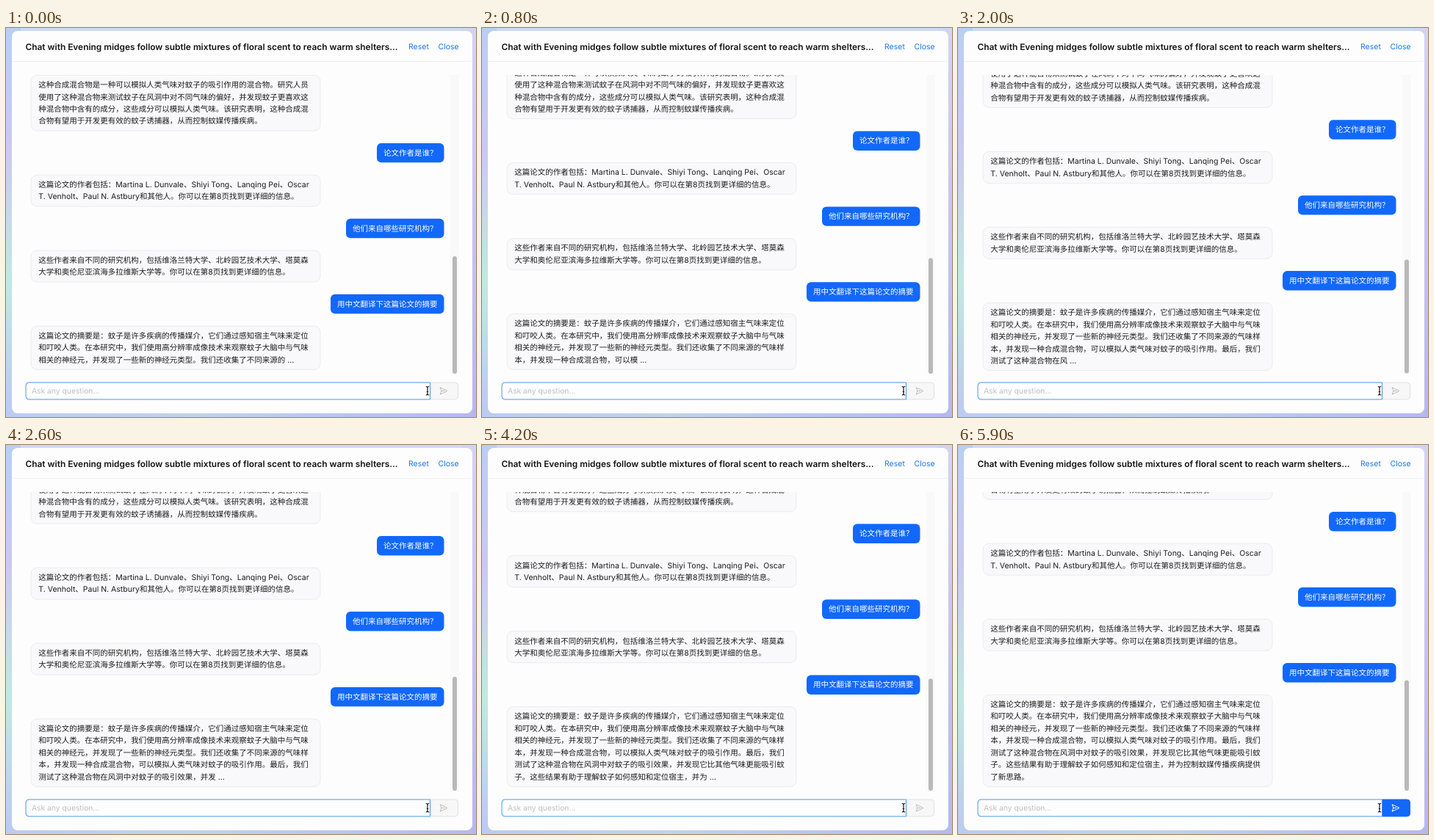
Write an HTML page that moves like this. It is 640 px wide and 530 px high and loops after 6000 ms.

```html
<!DOCTYPE html>
<html lang="zh-CN">
<head>
<meta charset="utf-8">
<title>Paper chat</title>
<style>
  html, body { margin: 0; width: 100%; height: 100%; overflow: hidden; background: #c9cdea; }
  svg { display: block; width: 640px; height: 530px; }
  text { font-family: Inter, "Noto Sans CJK SC", "Noto Sans CJK", sans-serif; font-size: 10.5px; text-rendering: geometricPrecision; white-space: pre; }
  .title { font-size: 11.9px; font-weight: 600; fill: #141414; }
  .link { fill: #1f75e6; }
  .hint { font-size: 10.3px; fill: #bfbfbf; }
  .bot rect { fill: #f9f9fb; stroke: #ececf0; }
  .bot text { fill: #1c1c1c; }
  .user rect { fill: #1268fa; }
  .user text { fill: #fff; }
</style>
</head>
<body>
<svg viewBox="0 0 640 530" xmlns="http://www.w3.org/2000/svg">
  <defs>
    <linearGradient id="left" x2="0" y2="1">
      <stop offset="0" stop-color="#b9cff2"/>
      <stop offset=".3" stop-color="#cbc9ee"/>
      <stop offset=".65" stop-color="#c3e8e2"/>
      <stop offset="1" stop-color="#bcc9f0"/>
    </linearGradient>
    <linearGradient id="right" x2="0" y2="1">
      <stop offset="0" stop-color="#d3d3f2"/>
      <stop offset="1" stop-color="#b4b8f0"/>
    </linearGradient>
    <linearGradient id="foot">
      <stop offset="0" stop-color="#bccbf0"/>
      <stop offset=".4" stop-color="#bfd3ec"/>
      <stop offset="1" stop-color="#b4b8f0"/>
    </linearGradient>
    <clipPath id="view"><rect x="20" y="64" width="600" height="408"/></clipPath>
  </defs>

  <rect width="640" height="530" fill="#d0d9f2"/>
  <rect width="20" height="530" fill="url(#left)"/>
  <rect x="620" width="20" height="530" fill="url(#right)"/>
  <rect y="515" width="640" height="15" fill="url(#foot)"/>
  <rect x="8" y="4" width="627" height="521" rx="8" fill="#fdfdfd"/>
  <path d="M8 45.5H635" stroke="#efeff2"/>

  <text class="title" x="26.5" y="29.5">Chat with Evening midges follow subtle mixtures of floral scent to reach warm shelters...</text>
  <text class="link" x="548" y="29">Reset</text>
  <text class="link" x="588.5" y="29">Close</text>

  <rect x="605" y="64" width="12" height="408" fill="#f9f9fa"/>
  <rect id="thumb" x="608" width="6" rx="3" fill="#b9b9b9"/>
  <g clip-path="url(#view)"><g id="chat"></g></g>

  <path id="send" d="M577.5 483H611.5a4 4 0 0 1 4 4V502a4 4 0 0 1-4 4H577.5Z"/>
  <path d="M577.5 483V506H31a4 4 0 0 1-4-4V487a4 4 0 0 1 4-4Z" fill="#fefefe" stroke="#4a94ee"/>
  <text class="hint" x="35" y="498">Ask any question...</text>
  <path id="plane" d="M591.2 489.8L601 494.5L591.2 499.2L592.8 494.5ZM592.8 494.5H597" fill="none" stroke-linejoin="round"/>
  <path d="M571.8 488.5Q574 488.5 574 490V498.5Q574 500 571.8 500M576.2 488.5Q574 488.5 574 490M576.2 500Q574 500 574 498.5M572.8 495.5H575.2" fill="none" stroke="#111" stroke-width="1.2"/>
</svg>
<script>
(() => {
  const NS = 'http://www.w3.org/2000/svg';
  const $ = id => document.getElementById(id);
  const LOOP = 6000, STEP = 100;
  const LINE = 16.45, PAD = 10, GAP = 16.8, PER_LINE = 35;
  const VIEW_TOP = 64, VIEW_H = 408, BASE_H = 1040;

  const talk = [
    ['bot',
      '这种合成混合物是一种可以模拟人类气味对蚊子的吸引作用的混合物。研究人员',
      '使用了这种混合物来测试蚊子在风洞中对不同气味的偏好，并发现蚊子更喜欢这',
      '种混合物中含有的成分，这些成分可以模拟人类气味。该研究表明，这种合成混',
      '合物有望用于开发更有效的蚊子诱捕器，从而控制蚊媒传播疾病。'],
    ['user', '论文作者是谁？'],
    ['bot',
      '这篇论文的作者包括：Martina L. Dunvale、Shiyi Tong、Lanqing Pei、Oscar',
      'T. Venholt、Paul N. Astbury和其他人。你可以在第8页找到更详细的信息。'],
    ['user', '他们来自哪些研究机构？'],
    ['bot',
      '这些作者来自不同的研究机构，包括维洛兰特大学、北岭园艺技术大学、塔莫森',
      '大学和奥伦尼亚滨海多拉维斯大学等。你可以在第8页找到更详细的信息。'],
    ['user', '用中文翻译下这篇论文的摘要']
  ];

  const answer =
    '这篇论文的摘要是：蚊子是许多疾病的传播媒介，它们通过感知宿主气味来定位' +
    '和叮咬人类。在本研究中，我们使用高分辨率成像技术来观察蚊子大脑中与气味' +
    '相关的神经元，并发现了一些新的神经元类型。我们还收集了不同来源的气味样' +
    '本，并发现一种合成混合物，可以模拟人类气味对蚊子的吸引作用。最后，我们' +
    '测试了这种混合物在风洞中对蚊子的吸引效果，并发现它比其他气味更能吸引蚊' +
    '子。这些结果有助于理解蚊子如何感知和定位宿主，并为控制蚊媒传播疾病提供' +
    '了新思路。';

  // [time, characters typed]
  const typing = [[0, 102], [500, 115], [1500, 137], [2000, 150], [3300, 179], [4200, 200], [4900, 215]];
  // [start, end] of each one-line scroll
  const scrolls = [[350, 760], [1650, 2070], [3210, 3660], [4670, 5100]];

  function add(parent, tag, attrs) {
    const el = document.createElementNS(NS, tag);
    for (const k in attrs) el.setAttribute(k, attrs[k]);
    return parent.appendChild(el);
  }

  const boxHeight = n => n * LINE + PAD;

  function bubble(kind, lines, y) {
    const g = add($('chat'), 'g', { class: kind });
    const bot = kind === 'bot';
    const width = bot ? 394 : lines[0].length * 10.5 + 18;
    const x = bot ? 34 : 596.5 - width;
    const rect = add(g, 'rect', { x, y, width, height: boxHeight(lines.length), rx: bot ? 8 : 6 });
    const texts = lines.map((line, i) => {
      const t = add(g, 'text', { x: x + (bot ? 10.3 : 9), y: y + 16.8 + i * LINE });
      t.textContent = line;
      return t;
    });
    return { rect, texts };
  }

  let y = 64.3;
  for (const [kind, ...lines] of talk) {
    bubble(kind, lines, y);
    y += boxHeight(lines.length) + GAP;
  }
  const last = bubble('bot', Array(7).fill(''), y);

  function typed(t) {
    for (let i = 1; i < typing.length; i++) {
      const [t0, n0] = typing[i - 1], [t1, n1] = typing[i];
      if (t < t1) return Math.floor(n0 + (n1 - n0) * (t - t0) / (t1 - t0));
    }
    return answer.length;
  }

  function ease(t, [a, b]) {
    const p = Math.min(1, Math.max(0, (t - a) / (b - a)));
    return p * p * (3 - 2 * p);
  }

  function draw(t) {
    const n = typed(t), done = n >= answer.length;
    const row = Math.floor(n / PER_LINE), count = Math.min(row + 1, last.texts.length);
    last.texts.forEach((el, i) => {
      const part = answer.slice(i * PER_LINE, Math.min(n, (i + 1) * PER_LINE));
      el.textContent = part + (i === row && !done ? (part ? ' ...' : '...') : '');
    });
    last.rect.setAttribute('height', boxHeight(count));

    const moved = LINE * scrolls.reduce((sum, s) => sum + ease(t, s), 0);
    $('chat').setAttribute('transform', `translate(0 ${-moved})`);

    const extra = (count - 3) * LINE;
    const ratio = VIEW_H / (BASE_H + extra);
    const height = VIEW_H * ratio;
    const rest = Math.max(0, extra - moved);
    $('thumb').setAttribute('height', height);
    $('thumb').setAttribute('y', VIEW_TOP + VIEW_H - 1 - height - rest * ratio);

    $('send').setAttribute('fill', done ? '#1268fa' : '#f7f7f7');
    $('send').setAttribute('stroke', done ? '#1268fa' : '#e0e0e2');
    $('plane').setAttribute('stroke', done ? '#fff' : '#bdbdbd');
  }

  const start = performance.now();
  function tick() {
    const t = (performance.now() - start) % LOOP;
    draw(Math.floor(t / STEP) * STEP);
    requestAnimationFrame(tick);
  }
  tick();
})();
</script>
</body>
</html>
```
